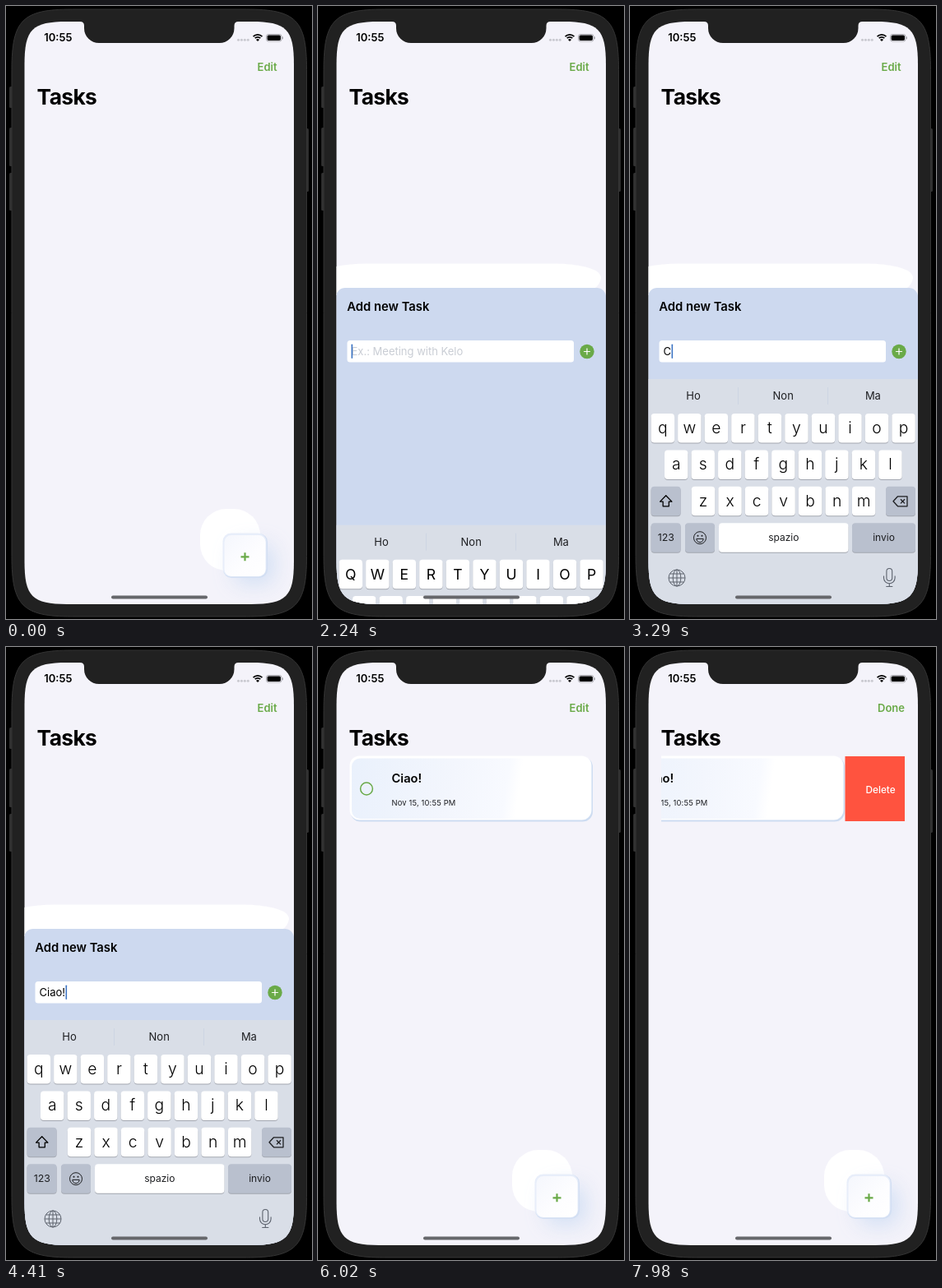
Write an HTML page with a canvas that moves like this. It is 372 by 746 pixels and loops after 8000 ms.

```html
<!DOCTYPE html>
<html lang="en">
<head>
<meta charset="utf-8">
<title>Tasks</title>
<style>
  html, body { margin: 0; width: 100%; height: 100%; overflow: hidden; background: #000; }
  canvas { display: block; width: 372px; height: 746px; }
</style>
</head>
<body>
<canvas id="stage"></canvas>
<script>
const W = 372, H = 746, LOOP = 8000, STEP = 70;
const GREEN = '#6aaa48', INK = '#1d1e21', ICON = '#5c626d';
const SCREEN = { x: 22.5, y: 19, w: 327.5, h: 709 };
const BOTTOM = SCREEN.y + SCREEN.h;
const KEYS_TOP = 454;
const OPEN = 2170, CLOSE = 5460;
const LETTER_TIMES = [3150, 3430, 3640, 3850, 4200];
const WORD = 'Ciao!';
// The keyboard is translucent: blue over the sheet, neutral over the list.
const OVER_SHEET = { back: '#d9dee7', grey: '#b9c0ce', rule: '#cdd5e3' };
const OVER_LIST = { back: '#dbdce2', grey: '#bdc1cc', rule: '#c9cbd2' };

const canvas = document.getElementById('stage');
const dpr = window.devicePixelRatio || 1;
canvas.width = W * dpr;
canvas.height = H * dpr;
const c = canvas.getContext('2d');

const clamp = (v, a = 0, b = 1) => Math.min(b, Math.max(a, v));

// Critically damped spring, 0 to 1, time in ms.
function spring(ms) {
  const u = 0.0177 * Math.max(0, ms);
  return 1 - (1 + u) * Math.exp(-u);
}

function box(x, y, w, h, r, fill) {
  c.beginPath();
  c.roundRect(x, y, w, h, r);
  if (fill) { c.fillStyle = fill; c.fill(); }
}

// Rectangle with continuous corners: one long cubic for each.
function smoothBox(x, y, w, h, r, fill) {
  const far = 1.528 * r, near = 0.272 * r, R = x + w, B = y + h;
  c.beginPath();
  c.moveTo(x, y + far);
  c.bezierCurveTo(x, y + near, x + near, y, x + far, y);
  c.lineTo(R - far, y);
  c.bezierCurveTo(R - near, y, R, y + near, R, y + far);
  c.lineTo(R, B - far);
  c.bezierCurveTo(R, B - near, R - near, B, R - far, B);
  c.lineTo(x + far, B);
  c.bezierCurveTo(x + near, B, x, B - near, x, B - far);
  c.closePath();
  c.fillStyle = fill;
  c.fill();
}

function disc(x, y, r, fill) {
  c.beginPath();
  c.arc(x, y, r, 0, 7);
  c.fillStyle = fill;
  c.fill();
}

function line(color, width, ...points) {
  c.beginPath();
  points.forEach(([x, y], i) => i ? c.lineTo(x, y) : c.moveTo(x, y));
  c.strokeStyle = color;
  c.lineWidth = width;
  c.stroke();
}

function plus(x, y, r, color, width) {
  line(color, width, [x - r, y], [x + r, y]);
  line(color, width, [x, y - r], [x, y + r]);
}

function text(s, x, y, size, { weight = 400, color = '#000', align = 'left', gap = 0 } = {}) {
  c.font = `${weight} ${size}px Inter, "Open Sans", sans-serif`;
  c.letterSpacing = gap + 'px';
  c.textAlign = align;
  c.fillStyle = color;
  c.fillText(s, x, y);
}

function layer(draw) {
  c.save();
  draw();
  c.restore();
}

function drawBody() {
  c.fillStyle = '#000';
  c.fillRect(0, 0, W, H);
  for (const [x, y, h] of [[4, 98, 26], [4, 148, 47], [4, 203, 46], [363, 149, 77]])
    box(x, y, 5, h, 1.5, '#303030');
  smoothBox(7, 4, 358.5, 739, 48, '#212121');
  c.strokeStyle = '#343434';
  c.lineWidth = 1;
  c.stroke();
}

function drawStatus() {
  c.beginPath();
  c.moveTo(90, 18);
  c.lineTo(90, 19);
  c.quadraticCurveTo(95, 19, 95, 24);
  c.arcTo(95, 45, 115, 45, 18);
  c.arcTo(277.5, 45, 277.5, 25, 18);
  c.lineTo(277.5, 24);
  c.quadraticCurveTo(277.5, 19, 282.5, 19);
  c.lineTo(282.5, 18);
  c.fillStyle = '#212121';
  c.fill();

  text('10:55', 46.3, 43, 13, { weight: 600 });
  for (let i = 0; i < 4; i++) disc(282.5 + i * 3.9, 41.3, 1.5, '#c9c9d0');
  c.strokeStyle = '#000';
  c.lineWidth = 1.7;
  for (const r of [4.7, 7.7]) {
    c.beginPath();
    c.arc(306, 42.5, r, -Math.PI * 0.75, -Math.PI * 0.25);
    c.stroke();
  }
  c.beginPath();
  c.moveTo(306, 43);
  c.arc(306, 43, 2.9, -Math.PI * 0.75, -Math.PI * 0.25);
  c.fillStyle = '#000';
  c.fill();

  box(316.5, 34.5, 18.5, 8.5, 2.5);
  c.strokeStyle = '#9a9aa0';
  c.lineWidth = 0.8;
  c.stroke();
  box(317.6, 35.6, 16.3, 6.3, 1.6, '#000');
  box(335.6, 37.3, 1.2, 3, 0.6, '#9a9aa0');
}

function drawAddButton(pressed) {
  layer(() => {
    if (pressed) c.globalAlpha = 0.6;
    box(236, 612, 73, 75, 32, '#fff');
    layer(() => {
      c.shadowColor = 'rgba(200,217,243,.8)';
      c.shadowBlur = 26 * dpr;
      c.shadowOffsetX = c.shadowOffsetY = 10 * dpr;
      box(268, 646, 47, 47, 9, '#dbe5f6');
    });
    box(264, 642, 54, 54, 10, '#d3dff3');
    box(263.5, 641.5, 53, 53, 10, '#e8eefa');
    const fill = c.createLinearGradient(266, 645, 315, 693);
    fill.addColorStop(0, '#f5f7fd');
    fill.addColorStop(0.6, '#fdfdff');
    fill.addColorStop(1, '#ffffff');
    box(265.5, 644, 50, 50, 8.5, fill);
    plus(290.5, 670.3, 5, GREEN, 2.2);
  });
}

function drawCard(offset) {
  layer(() => {
    c.beginPath();
    c.rect(38, 130, 296, 84);
    c.clip();
    layer(() => {
      c.translate(-offset, 0);
      box(39.5, 134, 294.5, 78.5, 12, '#cddcf1');
      box(38.5, 132.5, 294, 78, 12, '#fff');
      const fill = c.createLinearGradient(41, 160, 242, 190);
      fill.addColorStop(0, '#eaf1fc');
      fill.addColorStop(0.6, '#f3f6fd');
      fill.addColorStop(0.92, '#f8faff');
      fill.addColorStop(1, '#ffffff');
      box(41, 135.5, 290, 73.5, 10, fill);
      c.beginPath();
      c.arc(59, 172.5, 7.4, 0, 7);
      c.strokeStyle = GREEN;
      c.lineWidth = 1.5;
      c.stroke();
      text(WORD, 89.5, 165, 14.7, { weight: 600 });
      text('Nov 15, 10:55 PM', 89.5, 192.5, 9.4, { color: INK, gap: 0.15 });
    });
    if (offset > 0) {
      const left = 334.5 - offset;
      c.fillStyle = '#ff533f';
      c.fillRect(left, 133, 334 - left, 79);
      text('Delete', left + 25, 177.5, 11.8, { weight: 500, color: '#fff' });
    }
  });
}

// Steady, fades out, stays dark, fades in again.
function caretAlpha(t) {
  const keys = LETTER_TIMES.filter(k => k <= t);
  const ms = (t - (keys.length ? keys[keys.length - 1] : OPEN)) % 1100;
  if (ms < 500) return 1;
  if (ms < 1000) return clamp(1 - (ms - 500) / 200);
  return (ms - 1000) / 100;
}

function drawSheet(t) {
  c.beginPath();
  c.moveTo(22, 317);
  c.quadraticCurveTo(38, 313.5, 60, 313.5);
  c.lineTo(290, 313.5);
  c.bezierCurveTo(312, 314, 344, 318, 344, 331);
  c.quadraticCurveTo(343, 340, 334, 345);
  c.lineTo(22, 352);
  c.fillStyle = '#fff';
  c.fill();

  box(22, 343, 328, 400, [11, 11, 0, 0], '#cdd9ef');
  text('Add new Task', 35.2, 371, 14.8, { weight: 600 });
  box(35.5, 407, 275.5, 26.5, 3.5, '#fff');
  const typed = WORD.slice(0, LETTER_TIMES.filter(k => k <= t).length);
  let caretX = 40.5;
  if (typed) {
    text(typed, 40.5, 425, 13);
    caretX += c.measureText(typed).width + 0.5;
  } else {
    text('Ex.: Meeting with Kelo', 40.5, 425, 13, { color: '#c9cdd4' });
  }
  layer(() => {
    c.globalAlpha = caretAlpha(t);
    box(caretX, 411.5, 1.6, 17.5, 0.8, '#3f76c4');
  });
  layer(() => {
    if (t >= 5250) c.globalAlpha = 0.5;
    disc(327, 420.5, 8.7, GREEN);
    plus(327, 420.5, 4, '#fff', 1.2);
  });
}

function key(x, y, w, fill = '#fff') {
  box(x, y + 1, w, 35.5, 4, '#a3a7b0');
  box(x, y, w, 35.5, 4, fill);
}

function drawShift(x, y, caps) {
  const shape = [[0, -7], [7.2, 0.3], [3.6, 0.3], [3.6, 6], [-3.6, 6], [-3.6, 0.3], [-7.2, 0.3]];
  c.beginPath();
  shape.forEach(([a, b]) => c.lineTo(x + a, y + b));
  c.closePath();
  c.lineJoin = 'round';
  c.lineWidth = 1.3;
  c.strokeStyle = c.fillStyle = '#000';
  c.stroke();
  if (caps) c.fill();
}

function drawBackspace(x, y) {
  c.beginPath();
  for (const [a, b] of [[-9, 0], [-3.5, -6], [8, -6], [8, 6], [-3.5, 6]]) c.lineTo(x + a, y + b);
  c.closePath();
  c.lineJoin = 'round';
  c.lineWidth = 1.3;
  c.strokeStyle = INK;
  c.stroke();
  line(INK, 1.3, [x, y - 2.6], [x + 5, y + 2.6]);
  line(INK, 1.3, [x, y + 2.6], [x + 5, y - 2.6]);
}

function drawSmile(x, y) {
  c.beginPath();
  c.arc(x, y, 7.5, 0, 7);
  c.strokeStyle = INK;
  c.lineWidth = 1;
  c.stroke();
  disc(x - 2.5, y - 2.4, 1, INK);
  disc(x + 2.5, y - 2.4, 1, INK);
  c.beginPath();
  c.arc(x, y + 1.2, 4.2, 0, Math.PI);
  c.closePath();
  c.stroke();
}

function drawGlobe(x, y) {
  c.strokeStyle = ICON;
  c.lineWidth = 1;
  for (const rx of [10, 4.8]) {
    c.beginPath();
    c.ellipse(x, y, rx, 10, 0, 0, 7);
    c.stroke();
  }
  line(ICON, 1, [x, y - 10], [x, y + 10]);
  for (const [dy, r] of [[-5, 8.6], [0, 10], [5, 8.6]])
    line(ICON, 1, [x - r, y + dy], [x + r, y + dy]);
}

function drawMic(x, y) {
  box(x - 3.4, y - 11, 6.8, 15, 3.4);
  c.strokeStyle = ICON;
  c.lineWidth = 1.1;
  c.stroke();
  c.beginPath();
  c.moveTo(x - 6.8, y - 2);
  c.lineTo(x - 6.8, y + 0.5);
  c.arc(x, y + 0.5, 6.8, Math.PI, 0, true);
  c.lineTo(x + 6.8, y - 2);
  c.stroke();
  line(ICON, 1.1, [x, y + 7.3], [x, y + 11]);
  line(ICON, 1.1, [x - 4, y + 11], [x + 4, y + 11]);
}

// After saving, the letters of each hint come in one by one.
function drawHints(top, t, rule) {
  ['Ho', 'Non', 'Ma'].forEach((word, i) => {
    c.font = '400 13px Inter, "Open Sans", sans-serif';
    c.letterSpacing = '0px';
    let x = 77 + i * 109.2 - c.measureText(word).width / 2;
    [...word].forEach((ch, n) => layer(() => {
      if (t >= CLOSE) c.globalAlpha = clamp((t - CLOSE) / 80 - n * 0.55, 0.2);
      text(ch, x, top + 24.8, 13, { color: INK });
      x += c.measureText(ch).width;
    }));
  });
  for (const x of [131.5, 240.5])
    line(rule, 1, [x, top + 10], [x, top + 31]);
}

function drawKeyboard(top, t) {
  const caps = t < LETTER_TIMES[0];
  const { back, grey, rule } = t < CLOSE ? OVER_SHEET : OVER_LIST;
  c.fillStyle = back;
  c.fillRect(22, top, 328, 300);
  drawHints(top, t, rule);

  ['qwertyuiop', 'asdfghjkl', 'zxcvbnm'].forEach((row, r) => {
    const y = top + 42 + r * 44.4;
    const first = [39.8, 56.2, 89][r];
    [...row].forEach((ch, i) => {
      const x = first + i * 32.53;
      key(x - 14.2, y, 28.4);
      if (caps) text(ch.toUpperCase(), x, y + 24.5, 17.6, { align: 'center' });
      else text(ch, x, y + 24, 19.3, { weight: 300, align: 'center' });
    });
  });

  const y3 = top + 130.8, y4 = top + 175.2;
  key(25.6, y3, 36, caps ? '#fff' : grey);
  drawShift(43.7, y3 + 18, caps);
  key(311, y3, 36, grey);
  drawBackspace(329, y3 + 18);

  key(25.6, y4, 36, grey);
  key(67, y4, 36, grey);
  key(108, y4, 157.5);
  key(270, y4, 77, grey);
  text('123', 43.8, y4 + 22.2, 12.3, { color: INK, align: 'center' });
  drawSmile(85, y4 + 18);
  text('spazio', 186.8, y4 + 21.5, 12, { color: INK, align: 'center' });
  text('invio', 308.5, y4 + 21.5, 12, { color: INK, align: 'center' });

  drawGlobe(57, top + 242);
  drawMic(315.3, top + 241.5);
}

function draw(t) {
  const sheet = t >= OPEN && t < CLOSE;
  const saved = t >= CLOSE;
  const swipe = clamp((t - 7560) / 210);
  const offset = t < 7630 ? 0 : 73 * (1 - (1 - swipe) ** 2);
  const rise = spring(t - OPEN) - spring(t - CLOSE - 16);
  const top = BOTTOM - (BOTTOM - KEYS_TOP) * rise;

  c.setTransform(dpr, 0, 0, dpr, 0, 0);
  drawBody();
  layer(() => {
    smoothBox(SCREEN.x, SCREEN.y, SCREEN.w, SCREEN.h, 34, '#f4f3fa');
    c.clip();
    text(offset ? 'Done' : 'Edit', 317.5, 79, 13, { weight: 600, color: GREEN, align: 'center' });
    text('Tasks', 37.6, 120, 26.3, { weight: 700, gap: -0.6 });
    if (saved) drawCard(offset);
    if (sheet) drawSheet(t);
    else drawAddButton(t >= 2100 && t < OPEN);
    if (top < BOTTOM - 0.3) drawKeyboard(top, t);
    box(128, 717.5, 117, 4, 2, '#66676b');
    drawStatus();
  });
}

const start = performance.now();
function tick() {
  const t = (performance.now() - start) % LOOP;
  draw(Math.floor(t / STEP) * STEP);
  requestAnimationFrame(tick);
}
tick();
</script>
</body>
</html>
```
